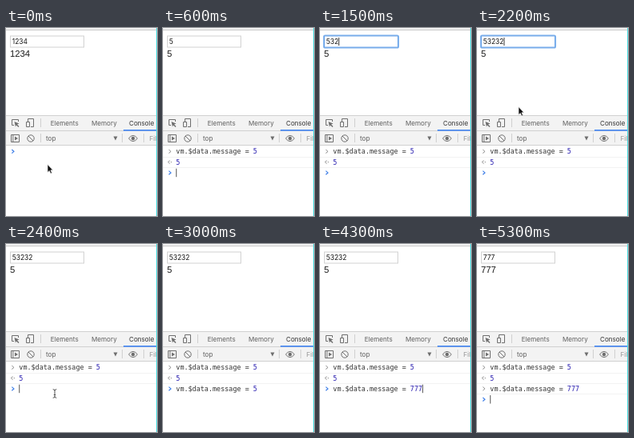
These frames come from a looping animation (189 by 235 pixels, 5400 ms). An HTML page:

```html
<!DOCTYPE html>
<html lang="en">
<head>
<meta charset="utf-8">
<title>Two-way binding in the console</title>
<style>
html, body { margin: 0; width: 100%; height: 100%; overflow: hidden; background: #fff; }
svg { display: block; width: 100vw; height: 100vh; }
text { white-space: pre; }
.field { font: 8.4px Inter, sans-serif; fill: #111; }
.output { font: 11.3px "Liberation Sans", Arial, sans-serif; fill: #1a1a1a; }
.ui { font: 8.1px Inter, sans-serif; fill: #5f5f5f; }
.mono { font: 8.45px "DejaVu Sans Mono", monospace; fill: #333; }
.num { fill: #2a1fb0; }
.rule { fill: #d0d0d0; }
.icon { fill: none; stroke: #6e6e6e; stroke-width: 1; }
.chevron { fill: none; stroke: #8a8a8a; stroke-width: 1; }
.live { stroke: #3f7fe8; stroke-width: 1.2; }
.row { fill: #f2f2f2; }
</style>
</head>
<body>
<svg viewBox="0 0 189 235">
  <rect width="189" height="235" fill="#fff"/>
  <rect width="189" height="2" fill="#f4f4f4"/>
  <rect y="2" width="189" height="1" fill="#c8c8c8"/>

  <rect id="glow" x="5" y="9.5" width="93" height="15" rx="1.5" fill="none" stroke="#7fb2ee" stroke-width="2.2"/>
  <rect id="box" x="5.5" y="10" width="92" height="14" fill="#fff"/>
  <text id="field" class="field" x="7.8" y="20"/>
  <rect id="fieldCaret" y="12" width="0.9" height="10" fill="#222"/>
  <text id="output" class="output" x="5" y="36.3"/>

  <rect y="109" width="189" height="38" fill="#f3f3f3"/>
  <rect class="rule" y="109" width="189" height="1"/>
  <rect class="rule" y="128" width="189" height="1"/>
  <rect class="rule" y="146" width="189" height="1"/>
  <rect class="rule" x="43" y="113" width="1" height="11"/>
  <rect class="rule" x="43" y="132" width="1" height="11"/>
  <rect class="rule" x="145" y="132" width="1" height="11"/>
  <rect class="rule" x="172" y="132" width="1" height="11"/>
  <rect x="147" y="127" width="42" height="1.6" fill="#4285f4"/>

  <path class="icon" d="M10 121.5H7.5V114.5H15.5V117"/>
  <path d="M10.5 117l6 2.5-2.5 1 2.5 2.6-1 1-2.6-2.6-1 2z" fill="#6e6e6e"/>
  <path class="icon" d="M27.5 117V113.5H34.5V123.5H31M25.5 117.5H29.5V123.5H25.5Z"/>
  <path class="icon" d="M6.5 133.5H16.5V142.5H6.5ZM8.8 133.5V142.5"/>
  <path d="M11 135.5l4 2.5-4 2.5z" fill="#6e6e6e"/>
  <circle class="icon" cx="31" cy="138" r="4.2"/>
  <path class="icon" d="M28 135l6 6"/>
  <path d="M134.5 135.5h5l-2.5 5z" fill="#6e6e6e"/>
  <path class="icon" d="M153.5 138q5.5-7.2 11 0q-5.5 7.2-11 0z"/>
  <circle cx="159" cy="138" r="2.2" fill="#6e6e6e"/>

  <text class="ui" x="55.7" y="121.5">Elements</text>
  <text class="ui" x="107" y="121.5">Memory</text>
  <text class="ui" x="154" y="121.5" style="fill:#333">Console</text>
  <text class="ui" x="50" y="140.8">top</text>
  <text class="ui" x="179.5" y="140.8" style="fill:#999">Filter</text>

  <g id="log"></g>
  <rect id="caret" width="0.9" height="10.5" fill="#444"/>
  <rect x="188" width="1" height="235" fill="#4fe0e4"/>

  <g id="arrow">
    <path d="M0 0.6V10.4L2.3 8.4L3.9 12L5.5 11.3L4 7.7H6.8Z" fill="#111" stroke="#fff" stroke-width="0.6"/>
  </g>
  <g id="beam">
    <path d="M-2.3-5.3Q0-5.3 0-3.8Q0-5.3 2.3-5.3M0-4V4M-2.3 5.3Q0 5.3 0 3.8Q0 5.3 2.3 5.3M-1.2 1.5H1.2" fill="none" stroke="#444" stroke-width="0.9"/>
  </g>
  <circle id="ring" cx="40" cy="15" r="10.7" fill="none" stroke="#000" stroke-width="2.2"/>
</svg>
<script>
const LOOP = 5400, CHAR = 5.087, LEFT = 16.3, ROW = 13.3;
const CMD = 'vm.$data.message = ';
const el = id => document.getElementById(id);
const show = (id, on) => el(id).setAttribute('visibility', on ? 'visible' : 'hidden');
const arrow = (x, y) => ({ mouse: ['arrow', x, y] });
const beam = (x, y) => ({ mouse: ['beam', x, y] });
const hidden = { mouse: null };

// Each step changes part of the state and holds until the next one.
const steps = [
  [0, { field: '1234', out: '1234', runs: 0, line: '', caret: false, focus: false, ring: false, ...arrow(52, 170) }],
  [200, { caret: true }],
  [300, { line: CMD + '5', ...hidden }],
  [500, { field: '5', out: '5', runs: 1, line: '' }],
  [800, arrow(54, 168)],
  [900, arrow(52, 108)],
  [1000, arrow(43, 42)],
  [1100, { ring: true, ...beam(40, 15) }],
  [1200, { ring: false, caret: false, focus: true }],
  [1400, { field: '53', ...hidden }],
  [1500, { field: '532' }],
  [1700, { field: '5323' }],
  [1900, { field: '53232' }],
  [2100, arrow(45, 48)],
  [2200, arrow(52, 98)],
  [2300, beam(60, 180)],
  [2400, { focus: false, caret: true, ...beam(61, 187) }],
  [2700, { line: CMD + '5', ...hidden }],
  [3000, { caret: false }],
  [3300, { line: CMD + '5\\', caret: true }],
  [3700, { caret: false }],
  [3800, { line: CMD + '5', caret: true }],
  [3900, { line: CMD }],
  [4000, { line: CMD + '7' }],
  [4100, { line: CMD + '77' }],
  [4200, { line: CMD + '777' }],
  [4400, { field: '777', out: '777', runs: 2, line: '' }],
  [4800, { caret: false }],
  [5200, { caret: true }]
];

const mid = row => 154.3 + row * ROW;
const code = (row, s) => {
  const parts = s.replace(/(\d+)/, '<tspan class="num">$1</tspan>');
  return `<text class="mono" x="${LEFT}" y="${mid(row) + 3}">${parts}</text>`;
};
const chevron = (row, live) =>
  `<path class="chevron ${live ? 'live' : ''}" d="M7.3 ${mid(row) - 2.3}l2.6 2.3-2.6 2.3"/>`;
const result = row =>
  `<path class="chevron" d="M8.5 ${mid(row) - 2}l-2.2 2 2.2 2"/><circle cx="10.3" cy="${mid(row)}" r="0.7" fill="#8a8a8a"/>`;
const rule = row => `<rect class="row" y="${Math.round(mid(row) + 6.3)}" width="188" height="1"/>`;

function drawLog({ runs, line }) {
  let out = '';
  if (runs) out += rule(0) + rule(1) + chevron(0) + code(0, CMD + '5') + result(1) + code(1, '5');
  if (runs > 1) out += rule(2) + chevron(2) + code(2, CMD + '777');
  const row = [0, 2, 3][runs];
  out += chevron(row, true) + code(row, line);
  el('log').innerHTML = out;
  el('caret').setAttribute('x', LEFT + line.length * CHAR);
  el('caret').setAttribute('y', mid(row) - 5.2);
}

function draw(s) {
  el('field').textContent = s.field;
  el('output').textContent = s.out;
  el('box').setAttribute('stroke', s.focus ? '#72a8e8' : '#d2d2d2');
  el('fieldCaret').setAttribute('x', 8 + el('field').getComputedTextLength());
  drawLog(s);
  show('glow', s.focus);
  show('fieldCaret', s.focus);
  show('caret', s.caret);
  show('ring', s.ring);
  for (const id of ['arrow', 'beam']) {
    const on = s.mouse && s.mouse[0] === id;
    show(id, on);
    if (on) el(id).setAttribute('transform', `translate(${s.mouse[1]} ${s.mouse[2]})`);
  }
}

const start = performance.now();
let last = -1;
function tick() {
  const t = (performance.now() - start) % LOOP;
  const count = steps.filter(([at]) => at <= t).length;
  if (count !== last) {
    draw(Object.assign({}, ...steps.slice(0, count).map(step => step[1])));
    last = count;
  }
  requestAnimationFrame(tick);
}
tick();
</script>
</body>
</html>
```
